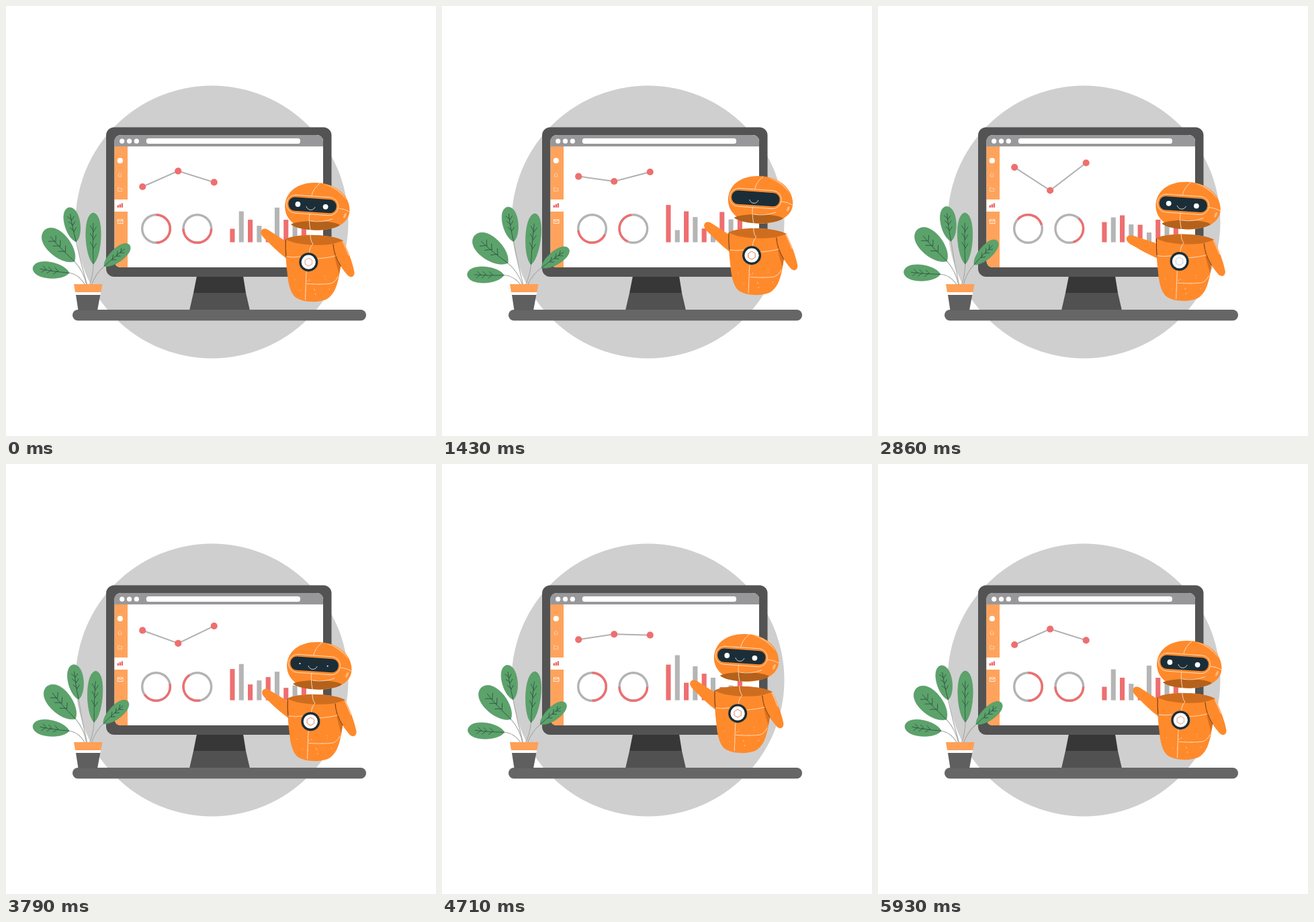
An HTML page for the animation above (6000 ms loop, 640 by 640 pixels).

```html
<!DOCTYPE html>
<html lang="en">
<head>
<meta charset="utf-8">
<title>Robot dashboard</title>
<style>
html, body { margin: 0; width: 100%; height: 100%; overflow: hidden; background: #fff; }
svg { display: block; width: 100vw; height: 100vh; }
.seam { fill: none; stroke: #ffe3c8; stroke-width: .9; stroke-linecap: round; }
.fold { fill: none; stroke: #4a2a12; stroke-width: .9; stroke-linecap: round; }
.icon { fill: none; stroke: #ffd9b8; stroke-width: .8; }
.vein { fill: none; stroke: #2c5140; stroke-width: .8; stroke-linecap: round; }
.stem { fill: none; stroke: #a3a8a3; stroke-width: 1.1; }
.ring { fill: none; stroke-width: 3.4; }
</style>
</head>
<body>
<svg viewBox="0 0 640 640">
  <circle cx="306.5" cy="321.5" r="203" fill="#cfcfcf"/>

  <!-- monitor -->
  <path d="M284 402H353L357 427H279Z" fill="#373737"/>
  <path d="M279 427H357L363 453H273Z" fill="#515151"/>
  <rect x="149" y="180.5" width="335.5" height="222.5" rx="12" fill="#535353"/>
  <rect x="161.5" y="192" width="310.5" height="197" rx="9" fill="#fff"/>
  <path d="M161.5 209V202Q161.5 192 171.5 192H462Q472 192 472 202V209Z" fill="#98989a"/>
  <g fill="#fff">
    <circle cx="172.7" cy="201.2" r="3.6"/><circle cx="183.5" cy="201.2" r="3.6"/><circle cx="194.3" cy="201.2" r="3.6"/>
    <rect x="208.8" y="197" width="229.2" height="8" rx="3.5"/>
  </g>
  <path d="M161.5 209H181V389H171.5Q161.5 389 161.5 379Z" fill="#ffa35c"/>
  <rect x="161.5" y="288" width="19.5" height="18" fill="#fff"/>
  <circle cx="169.8" cy="230.2" r="4.1" fill="#fff"/>
  <path class="icon" d="M166.5 251.5L169.5 248.5L172.5 251.5M167.4 251V254H171.6V251M166.5 270.5H169L170 271.5H172.8V275.5H166.5Z"/>
  <path class="icon" d="M166.3 318H174V323.5H166.3ZM166.3 318L170.1 321L174 318" style="stroke:#fff"/>
  <path d="M165.5 296.5H168V300H165.5ZM168.6 295H171V300H168.6ZM171.6 293.5H174V300H171.6Z" fill="#ee6a6a"/>

  <!-- charts -->
  <polyline id="line" fill="none" stroke="#b0b0b0" stroke-width="2"/>
  <g id="dots" fill="#ee6f70"></g>
  <g id="rings"></g>
  <g id="bars"></g>

  <rect x="99" y="452" width="437" height="16.3" rx="8.1" fill="#666"/>

  <!-- plant -->
  <g id="leaves"></g>
  <path d="M101 414H143.5L141.3 426H103Z" fill="#ffa057"/>
  <path d="M103 426H141.3L140.3 430H104Z" fill="#fff"/>
  <path d="M104 430H140.3L136 453H107.5Z" fill="#5f5f5f"/>

  <!-- robot -->
  <g id="robot">
    <g id="arm">
      <path d="M379.5 338C378.6 332 384.6 329.6 389.5 332.8L420 352.5L428 384C416 375 402 364 391 352C386 347 380.4 343 379.5 338Z" fill="#ff8a2c"/>
    </g>
    <path d="M416 347C415.5 366 417 383 418.5 396C420 415 424 430 433 435C445 441.5 465 441.5 476 437C488 431 493 417 496 400C499 383 499 366 502 349C480 339 436 338 416 347Z" fill="#ff8a2c"/>
    <path d="M416 347C428 338.5 486 338.5 502 349.5C486 358.5 432 358 416 347Z" fill="#cf6d1f"/>
    <path class="fold" d="M416.2 348Q415.6 362 417 374"/>
    <path d="M487 354L501.5 349.5C509 363 516 383 518.5 396C519 404 512 406 507 399C497 388 489 371 487 354Z" fill="#ff8a2c"/>
    <path class="fold" d="M487 355Q488 371 498 387"/>
    <path d="M487 357Q489 374 498 388L496 399Q488 374 487 357Z" fill="#d9701e"/>
    <path class="seam" d="M417 373Q428 375 438 373M453 341Q453 350 457 354Q452 359 451.5 367M447 396Q446 417 445.5 437M448 413.5Q470 415 484 413Q491 410 494 403M463 376Q479 375 490 372M501 350Q506 361 510 371"/>
    <g id="specks" fill="#ffe0c2"></g>
    <circle cx="450.3" cy="381.2" r="14" fill="#1b2e38"/>
    <circle cx="450.3" cy="381.2" r="10.6" fill="#fff"/>
    <path d="M450.3 375.2L455.5 378.2V384.2L450.3 387.2L445.1 384.2V378.2Z" fill="none" stroke="#c4c4c4" stroke-width=".8"/>
    <path id="hex" d="M450.3 375.2L455.5 378.2V384.2L450.3 387.2L445.1 384.2V378.2Z" fill="none" stroke="#f58a5c" stroke-width=".9"/>

    <path d="M415 298C416 276 434 263 460 263C489 263 511 280 511.5 304C511 321 496 332 466 334C435 334 415 320 415 298Z" fill="#ff8a2c"/>
    <path d="M424 325C435 318.5 485 318 497 326C486 335.5 437 336.5 424 325Z" fill="#b4611b"/>
    <path d="M473 265Q497 269 507 289Q494 272 473 265Z" fill="#ffb878"/>
    <ellipse cx="504.5" cy="312" rx="1.7" ry="4.2" transform="rotate(25 504.5 312)" fill="#ffb878"/>
    <path class="seam" d="M467 264Q457 272 455 282M495 301Q504 302 511 306M452 309Q450 317 453 333M453 320Q470 323 486 317"/>
    <g transform="rotate(4 456 296.5)">
      <rect x="417.5" y="283" width="77" height="27" rx="13" class="seam"/>
      <rect x="420.3" y="286.3" width="71.5" height="20.2" rx="9.5" fill="#1b2e38"/>
    </g>
    <path d="M447 298.5Q449 303.5 453.5 303.5Q458 303.5 460 299.5" fill="none" stroke="#dfe5e8" stroke-width=".9" stroke-linecap="round"/>
    <g id="eyes" fill="#fff"><circle cx="434.4" cy="295" r="3.9"/><circle cx="475.6" cy="298.8" r="3.9"/></g>
  </g>
</svg>
<script>
const LOOP = 6000, STEP = LOOP / 84;
const NS = 'http://www.w3.org/2000/svg';
const $ = id => document.getElementById(id);

function add(parent, tag, attrs) {
  const el = document.createElementNS(NS, tag);
  for (const k in attrs) el.setAttribute(k, attrs[k]);
  return parent.appendChild(el);
}

const ease = u => (1 - Math.cos(Math.PI * Math.min(1, Math.max(0, u)))) / 2;

// Monotone cubic through the keys: smooth, with flat turning points.
function track(times, vals) {
  const n = times.length;
  const slope = i => (vals[i + 1] - vals[i]) / (times[i + 1] - times[i]);
  const tan = vals.map((_, i) => {
    if (i === 0 || i === n - 1) return 0;
    const a = slope(i - 1), b = slope(i);
    return a * b <= 0 ? 0 : 2 * a * b / (a + b);
  });
  return t => {
    let i = 0;
    while (i < n - 2 && t >= times[i + 1]) i++;
    const h = times[i + 1] - times[i], u = (t - times[i]) / h, v = 1 - u;
    return vals[i] * (1 + 2 * u) * v * v + tan[i] * h * u * v * v
      + vals[i + 1] * u * u * (3 - 2 * u) - tan[i + 1] * h * u * u * v;
  };
}

const KEYS = [0, 1430, 2290, 2860, 3790, 4710, 5930];
const keyed = vals => {
  const f = track(KEYS, [...vals, vals[0]]);
  return t => f(Math.min(t, 5930));
};

const robotX = track([0, 640, 1180, 1430, 2000, 2290, 2860, 3500, 3790, 4710, 5930, 6000],
  [0, 7, 13, 10.7, 1, -3.6, -1.7, 4.3, 3, -10.2, 0, 0]);
const robotY = track([0, 120, 710, 1430, 1930, 2290, 2860, 3500, 3790, 4710, 5860, 6000],
  [0, .5, -5, -10, -7.5, -5, -1.2, 3.3, 2, -10, 0, 0]);
const armTurn = keyed([0, 0, -23, -15, -2, 0]);
const hexGlow = keyed([.6, 1, 0, .1, 1, 1]);

const bars = [
  [20, 55.5, 42, 30, 46.5, 53],
  [46, 18, 27, 37, 54, 67],
  [33.5, 46, 48, 40, 23.5, 26],
  [24.5, 37.5, 33.5, 26.5, 29.5, 50.5],
  [11, 20.5, 25, 26, 34.5, 39.5],
  [51.5, 24.5, 8.5, 14.5, 42.5, 33.5],
  [33.5, 45, 50, 33.5, 18.5, 19.5],
  [25, 34, 25, 25, 22, 22],
  [25, 33, 30, 28, 25, 32]
].map((h, i) => ({
  height: keyed(h),
  el: add($('bars'), 'rect', { x: 333.4 + 13.3 * i, width: 7.1, fill: i % 2 ? '#b5b5b5' : '#ee6f70' })
}));

const dots = [203.2, 256.2, 309.7].map(x => ({ x, el: add($('dots'), 'circle', { cx: x, r: 5.1 }) }));

const rings = [[223.5, 0], [284.8, 90]].map(([x, rest]) => {
  add($('rings'), 'circle', { class: 'ring', cx: x, cy: 331.5, r: 20.8, stroke: '#b3b3b3' });
  return { x, rest, el: add($('rings'), 'path', { class: 'ring', stroke: '#ee6f70' }) };
});

// centre x, y, half length, half width, direction of the tip, foot of the stem, sway
const leaves = [
  [67, 393.5, 27.2, 11.8, 188, 118, [0, -6.8, -6.8, -4, 0, -4]],
  [79.5, 357, 32, 16.5, 226, 120, [0, -6.6, -4.6, 1, 2.4, 1]],
  [99, 325.5, 26, 11.3, 258, 121, [0, 1.9, 3.8, 3.8, 3.2, 1.3]],
  [130, 346, 38, 11, 270, 124, [0, 4.6, -.8, -.4, 2, 4.6]],
  [165, 371.5, 24.5, 9.7, -40, 127, [0, 4.7, 1, -6, -2.3, .3]]
].map(([x, y, a, b, dir, foot, sway]) => {
  const g = add($('leaves'), 'g', {});
  const rad = dir * Math.PI / 180, dx = Math.cos(rad), dy = Math.sin(rad);
  const bx = x - a * dx, by = y - a * dy;
  const reach = Math.hypot(foot - bx, 416 - by) * .5;
  add(g, 'path', { class: 'stem', d: `M${bx} ${by}Q${bx - dx * reach} ${by - dy * reach} ${foot} 416` });
  const leaf = add(g, 'g', { transform: `translate(${x} ${y}) rotate(${dir})` });
  add(leaf, 'path', {
    fill: '#5ca26b', stroke: '#549663', 'stroke-width': .6,
    d: `M${-a} 0C${-.7 * a} ${-1.2 * b} ${.95 * a} ${-1.5 * b} ${a} 0C${.95 * a} ${1.5 * b} ${-.7 * a} ${1.2 * b} ${-a} 0Z`
  });
  let veins = `M${-a} 0Q0 ${-.12 * b} ${.6 * a} 0`;
  for (const k of [-.35, 0, .3])
    veins += `M${k * a} 0l${.2 * a} ${-.42 * b}M${(k - .05) * a} 0l${.2 * a} ${.4 * b}`;
  add(leaf, 'path', { class: 'vein', d: veins });
  return { g, sway: keyed(sway) };
});

let seed = 7;
const rnd = () => (seed = seed * 16807 % 2147483647) / 2147483647;
for (let i = 0; i < 16; i++)
  add($('specks'), 'circle', { cx: 426 + rnd() * 60, cy: 398 + rnd() * 34, r: .3 + rnd() * .4 });

function point(x, deg) {
  const a = deg * Math.PI / 180;
  return `${x + 20.8 * Math.sin(a)} ${331.5 - 20.8 * Math.cos(a)}`;
}

function draw(t) {
  const swing = 29 * (t < 2750 ? ease(t / 2750) : 1 - ease((t - 2750) / 3000));
  const ys = [269 - swing, 245.6 + swing, 262.4 - swing];
  dots.forEach((d, i) => d.el.setAttribute('cy', ys[i]));
  $('line').setAttribute('points', dots.map((d, i) => d.x + ',' + ys[i]).join(' '));

  const beat = t % 1200;
  const head = 360 * ease(beat / 600), tail = 180 + 360 * ease(beat / 720);
  for (const r of rings)
    r.el.setAttribute('d', `M${point(r.x, r.rest + head)}A20.8 20.8 0 0 1 ${point(r.x, r.rest + tail)}`);

  for (const b of bars) {
    const h = b.height(t);
    b.el.setAttribute('y', 351.6 - h);
    b.el.setAttribute('height', h);
  }

  for (const l of leaves) l.g.setAttribute('transform', `rotate(${l.sway(t)} 122 415)`);

  $('robot').setAttribute('transform', `translate(${robotX(t)} ${robotY(t)})`);
  $('arm').setAttribute('transform', `rotate(${armTurn(t)} 423 372)`);
  $('hex').setAttribute('opacity', hexGlow(t));
  const open = ease((Math.abs(beat - 235) - 3) / 135);
  for (const eye of $('eyes').children) eye.setAttribute('r', 3.9 * open);
}

function tick() {
  const frame = Math.floor((performance.now() % LOOP + 5) / STEP) % 84;
  draw(frame === 83 ? 0 : frame * STEP);
  requestAnimationFrame(tick);
}
tick();
</script>
</body>
</html>
```
